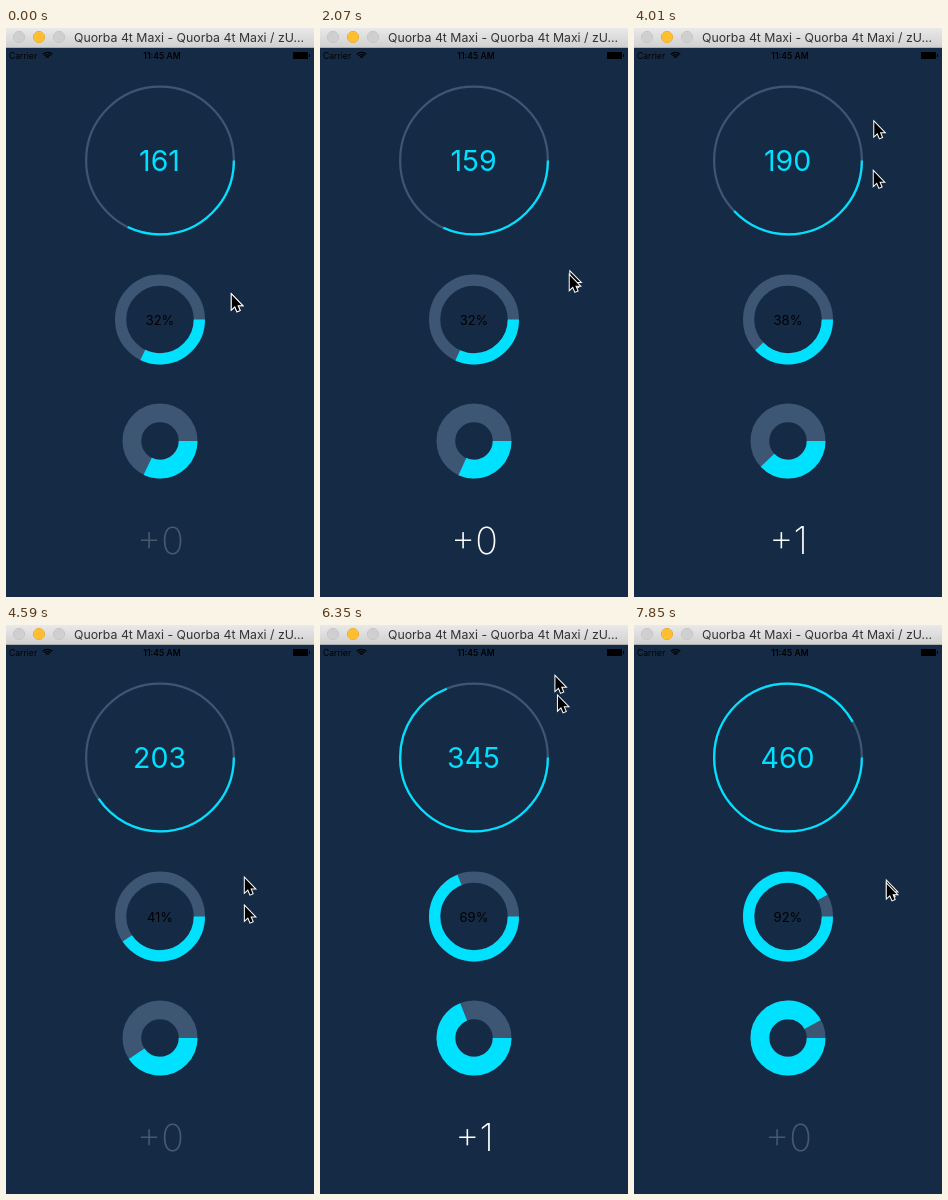
Recreate the animation shown at these times as an HTML page with a canvas. Size 308 px wide and 569 px high, loop 8000 ms.

```html
<!DOCTYPE html>
<html lang="en">
<head>
<meta charset="utf-8">
<title>Progress rings</title>
<style>
  html, body { margin: 0; width: 100%; height: 100%; overflow: hidden; background: #152b45; }
  canvas { display: block; }
</style>
</head>
<body>
<canvas id="stage" width="308" height="569"></canvas>
<script>
const ctx = document.getElementById('stage').getContext('2d');
const LOOP = 8000, STEP = 148, LAST = 53;
const START = 161, MAX = 500, FULL = 2 * Math.PI;
const CYAN = '#00e0ff', TRACK = '#3c5673', FONT = 'Inter, Roboto, sans-serif';

// Each swipe moves the value and then slows down; a fling leaves the label idle.
const swipes = [
  { from: 1, steps: 4, amount: 3 },
  { from: 6, steps: 10, amount: -5 },
  { from: 16, steps: 7, amount: -64 },
  { from: 23.5, steps: 7, amount: 108 },
  { from: 32, steps: 5, amount: 63 },
  { from: 38.8, steps: 8, amount: 101 },
  { from: 47, steps: 6, amount: 93, fling: true }
];

// Turning points of the pointer: [step, position]
const turnsX = [[0, 225], [8, 251], [31, 238], [38, 231], [49, 252]];
const turnsY = [
  [0, 266], [5, 303], [9, 235], [20, 262], [26, 93], [29, 291],
  [34, 179], [36, 126], [41.5, 49], [44, 270], [46.5, 97], [52.5, 258]
];

const clamp = p => Math.min(1, Math.max(0, p));
const easeOut = p => 1 - (1 - p) ** 3;
const easeInOut = p => (1 - Math.cos(Math.PI * p)) / 2;

const valueAt = step => Math.round(swipes.reduce(
  (sum, s) => sum + s.amount * easeOut(clamp((step - s.from) / s.steps)), START));

const follow = (turns, step) => turns.slice(1).reduce((pos, [end, target], i) => {
  const begin = turns[i][0];
  return pos + (target - turns[i][1]) * easeInOut(clamp((step - begin) / (end - begin)));
}, turns[0][1]);

function text(str, x, y, size, weight, color, align = 'center') {
  ctx.font = `${weight} ${size}px ${FONT}`;
  ctx.textAlign = align;
  ctx.fillStyle = color;
  ctx.fillText(str, x, y);
}

function arc(x, y, r, from, to, width, color) {
  ctx.beginPath();
  ctx.arc(x, y, r, from, to);
  ctx.lineWidth = width;
  ctx.strokeStyle = color;
  ctx.stroke();
}

function ring(y, outer, width, part) {
  const r = outer - width / 2;
  arc(154, y, r, 0, FULL, width, TRACK);
  arc(154, y, r, 0, part * FULL, width, CYAN);
}

function windowBar() {
  const shade = ctx.createLinearGradient(0, 0, 0, 19);
  shade.addColorStop(0, '#e9e9e9');
  shade.addColorStop(1, '#d1d1d1');
  ctx.fillStyle = shade;
  ctx.fillRect(0, 0, 308, 19);
  ctx.fillStyle = '#aeaeae';
  ctx.fillRect(0, 19, 308, 1);
  ['#d0cfd0', '#fdbe2f', '#d0cfd0'].forEach((fill, i) => {
    arc(13 + 20 * i, 9, 5.5, 0, FULL, 1, i === 1 ? '#e0a028' : '#bdbcbd');
    ctx.fillStyle = fill;
    ctx.fill();
  });
  text('Quorba 4t Maxi - Quorba 4t Maxi / zU...', 68, 14, 12.3, 400, '#333', 'left');
}

function statusBar() {
  text('Carrier', 3, 31, 8.6, 400, '#000', 'left');
  text('11:45 AM', 156, 31, 8.6, 600, '#000');
  for (const r of [2.2, 4.4, 6.6]) arc(41.5, 31, r, -2.36, -.78, 1.3, '#000');
  ctx.fillRect(287, 24, 15, 7);
  ctx.fillRect(303, 26, 1, 3);
}

const arrow = new Path2D('M0 0V14L3.2 11L5.4 16.2L7.7 15.2L5.6 10.2H9.9Z');
function cursor(step) {
  ctx.save();
  ctx.translate(follow(turnsX, step) + .8, follow(turnsY, step) + 1);
  ctx.lineWidth = 2;
  ctx.strokeStyle = '#fff';
  ctx.stroke(arrow);
  ctx.fillStyle = '#000';
  ctx.fill(arrow);
  ctx.restore();
}

function changeLabel(step) {
  const change = Math.sign(valueAt(step) - valueAt(step - 1));
  const dragging = swipes.some(s => !s.fling && step > s.from && step <= s.from + s.steps);
  const label = !dragging ? '+0' : change < 0 ? '\u22121' : '+' + change;
  text(label, 154.5, 525.5, 37.5, 200, dragging ? '#fff' : 'rgba(255,255,255,.22)');
}

function draw(now) {
  const step = Math.min(LAST, Math.floor((now % LOOP + 12) / STEP));
  const value = valueAt(step), part = value / MAX;

  ctx.fillStyle = '#152b45';
  ctx.fillRect(0, 0, 308, 569);
  windowBar();
  statusBar();

  ring(132.5, 75, 2.25, part);
  ring(291.5, 45, 11.25, part);
  ring(413, 37.5, 18.75, part);
  text(value, 153.5, 143, 28.5, 400, CYAN);
  text(Math.round(part * 100) + '%', 154, 296.5, 13, 400, '#000');
  changeLabel(step);

  // The previous position lingers behind the pointer.
  cursor(step - 1);
  cursor(step);
  requestAnimationFrame(draw);
}
requestAnimationFrame(draw);
</script>
</body>
</html>
```
